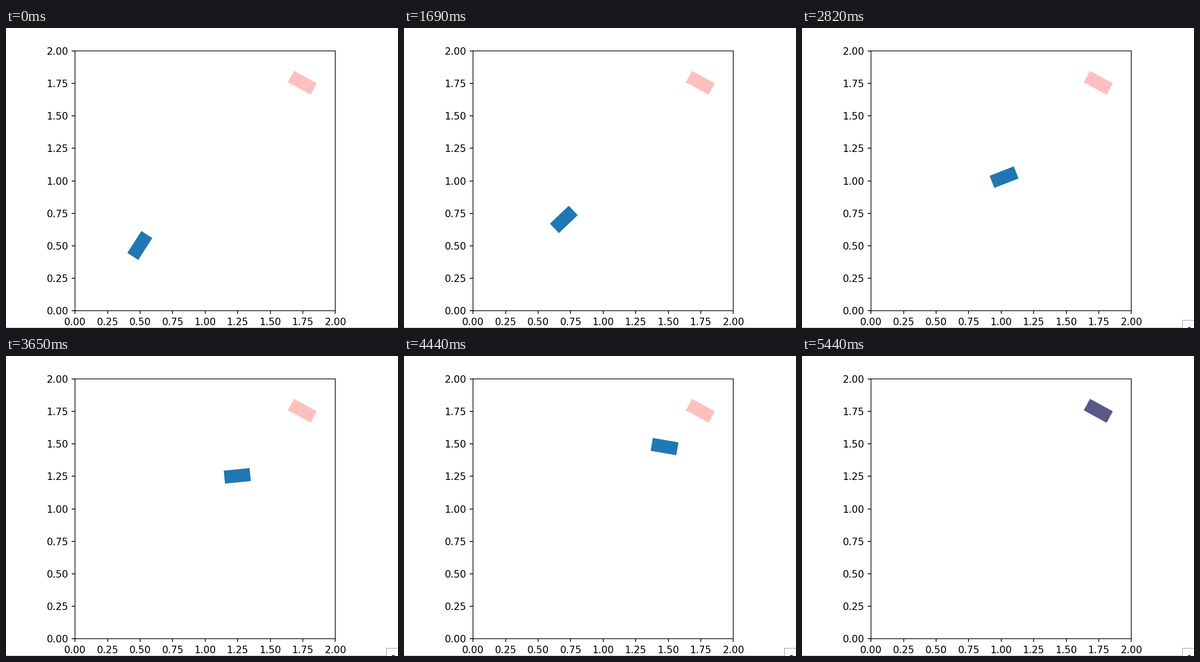
A matplotlib script that plays this animation: 836x639 px, repeating every 6760 ms.

```python
import matplotlib.pyplot as plt
import numpy as np
from matplotlib.animation import FuncAnimation
from matplotlib.patches import Rectangle

W, H, DPI = 836, 639, 150
LOOP, INTERVAL = 6760, 20
LENGTH, WIDTH = 0.2, 0.1

START = np.array([0.5, 0.5, 1.0])   # x, y, heading in radians
GOAL = np.array([1.75, 1.75, -0.5])

# The box takes equal steps, but the screen only refreshes once per tick.
STEPS = 50
MOVE_TIME, TICK = 1000, 67.1
STEPS_PER_TICK, FIRST_STEP = 0.742, 1.205
POPUP_TIME = 1960

plt.rcParams["font.family"] = "DejaVu Sans"
fig = plt.figure(figsize=(W / DPI, H / DPI), dpi=DPI, facecolor="white")


def pixel_axes(left, top, width, height, **limits):
    """Add transparent axes placed by pixels, measured from the top left."""
    box = [left / W, 1 - (top + height) / H, width / W, height / H]
    return fig.add_axes(box, facecolor="none", **limits)


def place(box, pose):
    x, y, heading = pose
    box.set_xy((x - LENGTH / 2, y - WIDTH / 2))
    box.set_angle(np.degrees(heading))


def add_box(pose, **style):
    box = Rectangle((0, 0), LENGTH, WIDTH, rotation_point="center",
                    linewidth=0, **style)
    place(box, pose)
    return plot.add_patch(box)


def add_block(left, top, width, height, color):
    block = Rectangle((left, top), width, height, color=color,
                      linewidth=0, antialiased=False)
    return screen.add_patch(block)


plot = pixel_axes(146.8, 47.4, 554.4, 554.4, xlim=(0, 2), ylim=(0, 2))
plot.axis("off")
mover = add_box(START, facecolor="tab:blue", zorder=1)
add_box(GOAL, facecolor="red", alpha=0.25, zorder=2)

# The frame sits on whole pixels of a coarser grid, slightly off the plot.
ticks = np.linspace(0, 2, 9)
frame_axes = pixel_axes(147.25, 48.75, 555, 553.5, xlim=(0, 2), ylim=(0, 2),
                        xticks=ticks, yticks=ticks)
for axis in (frame_axes.xaxis, frame_axes.yaxis):
    axis.set_major_formatter("{x:.2f}")
for spine in frame_axes.spines.values():
    spine.set(snap=False, linewidth=1.5 * 72 / DPI)

# Window edge and the corner of a popup, in pixel coordinates.
screen = pixel_axes(0, 0, W, H, xlim=(0, W), ylim=(H, 0))
screen.axis("off")
add_block(0, 638, W, 1, "#b4b4b4")
popup = [
    add_block(811, 622, 25, 17, "#8c8c8c"),
    add_block(812, 623, 24, 16, "white"),
    add_block(823, 637, 6, 2, "#404040"),
]


def progress(time):
    tick = np.floor((time - MOVE_TIME) / TICK)
    step = np.floor(tick * STEPS_PER_TICK + FIRST_STEP)
    return np.clip(step, 0, STEPS) / STEPS


def update(frame):
    time = (frame + 0.5) * INTERVAL
    place(mover, START + (GOAL - START) * progress(time))
    for block in popup:
        block.set_visible(time >= POPUP_TIME)
    return [mover, *popup]


animation = FuncAnimation(fig, update, frames=LOOP // INTERVAL,
                          interval=INTERVAL, repeat=True, repeat_delay=0)
plt.show()
```
